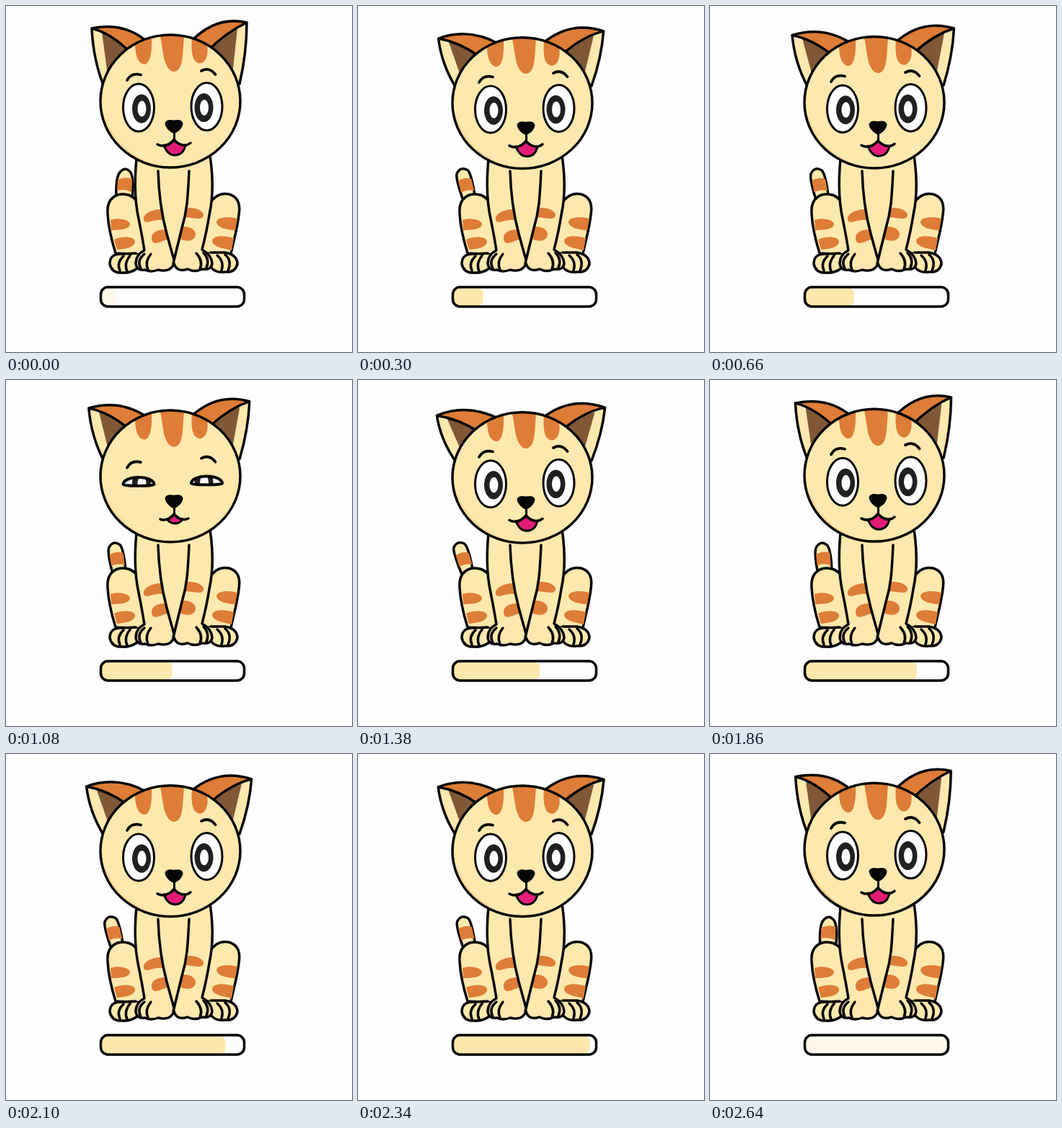
Animation of 480x480 px, one loop 2700 ms. Source, as an HTML page with a canvas:

```html
<!DOCTYPE html>
<html>
<head>
<meta charset="utf-8">
<style>
html, body { margin: 0; width: 100%; height: 100%; overflow: hidden; background: #fefefe; }
canvas { display: block; }
</style>
</head>
<body>
<canvas id="stage" width="480" height="480"></canvas>
<script>
const ctx = document.getElementById('stage').getContext('2d');
const LOOP = 2700, SWAY = 900, STEP = 60, LINE = 3.5;
const INK = '#050505', CREAM = '#fde8ae', ORANGE = '#de7d37', BROWN = '#805837', PINK = '#e31c78', WHITE = '#fefefe';
ctx.lineCap = ctx.lineJoin = 'round';

function draw(path, fill, line = 0) {
  const shape = new Path2D(path);
  if (fill) { ctx.fillStyle = fill; ctx.fill(shape); }
  if (line) { ctx.strokeStyle = INK; ctx.lineWidth = line; ctx.stroke(shape); }
}

function oval(x, y, rx, ry, fill, line) {
  draw(`M${x - rx} ${y}a${rx} ${ry} 0 0 1 ${2 * rx} 0a${rx} ${ry} 0 0 1 ${-2 * rx} 0Z`, fill, line);
}

const mix = (a, b, k) => a + (b - a) * k;
const clamp = v => Math.max(0, Math.min(1, v));

// Blends two paths that share the same commands.
function morph(a, b, k) {
  const ends = b.match(/[\d.]+/g);
  let i = 0;
  return a.replace(/[\d.]+/g, n => mix(+n, +ends[i++], k).toFixed(2));
}

function track(time, keys) {
  const i = Math.max(1, keys.findIndex(key => key[0] >= time));
  const [t0, v0] = keys[i - 1], [t1, v1] = keys[i];
  return mix(v0, v1, (time - t0) / (t1 - t0));
}

const EAR_KEYS = [[0, 0], [60, .06], [180, .42], [360, .9], [420, 1], [480, .96], [540, .78], [660, .5], [720, .2], [840, .03], [900, 0]];
const TAIL_KEYS = [[0, 0], [60, .39], [180, .57], [300, .8], [420, 1], [480, .97], [540, .78], [660, .68], [720, .4], [840, .03], [900, 0]];

function tail(k) {
  draw(morph('M153 268Q152 240 157 232Q165 221 173 231Q178 240 175 268',
             'M146 275Q131 240 132 233Q136 222 147 227Q153 232 160 270', k), CREAM, LINE);
  draw(morph('M155 241Q165 236 175 240L174 258Q164 253 154 256Z',
             'M135 243Q145 237 153 240L158 256Q150 254 140 259Z', k), ORANGE);
}

function body() {
  // Haunches
  draw('M184 275C178 262 165 259 155 262C144 266 140 275 141 288C142 310 148 330 152 343L192 345', CREAM, LINE);
  draw('M282 275C290 262 300 259 309 261C320 264 325 272 323.5 286C321 310 315 328 312 344L272 343', CREAM, LINE);
  draw('M145 297C155 293 172 296 172 303C171 310 158 311 146 311Z M150 324C160 319 179 319 179 327C178 335 166 337 154 338Z', ORANGE);
  draw('M321 295C308 291 292 293 292 300C293 307 306 311 318 311Z M316 322C303 318 287 318 286 326C287 334 300 336 313 339Z', ORANGE);
  // Hind paws
  draw('M161 344Q144 343 144 358Q147 371 161 370Q173 371 182 364L190 345Z', CREAM);
  draw('M161 344Q144 343 144 358Q147 371 161 370Q173 371 182 364M163 347Q153 356 158 367M173 345Q163 357 168 368M161 344L180 343', null, LINE);
  draw('M304 342Q321 345 321 358Q318 370 304 369Q291 371 284 362L276 343Z', CREAM);
  draw('M304 342Q321 345 321 358Q318 370 304 369Q291 371 284 362M293 346Q303 354 299 367M304 345Q314 353 308 367M284 342L304 342', null, LINE);
  // Chest and front legs
  draw('M183 195Q175 255 184 295Q189 320 192 339Q180 345 180 358Q182 368 193 366Q201 370 211 366Q229 370 233 357Q237 370 252 365Q262 370 272 365Q285 367 286 357Q285 345 272 338Q279 310 282 290Q291 250 281 195Z', CREAM, LINE);
  draw('M191 296C190 288 203 282 216 282L218 297C207 296 203 299 196 300Q191 300 191 296Z M202 322C202 314 210 310 221 310L225 324C217 325 213 329 207 329Q202 328 202 322Z', ORANGE);
  draw('M252 280C265 279 275 285 274 291C272 298 263 294 249 293Z M245 306C256 305 264 311 263 318C261 327 250 328 239 322Z', ORANGE);
  draw('M211 229C212 265 216 290 223 316L233 352M254 229C252 270 251 285 244 308L232 357', null, LINE);
  draw('M192 344Q181 353 187 364M201 344Q192 355 197 366M274 342Q283 352 278 363M264 343Q274 354 269 365', null, LINE);
}

function ears(k) {
  const at = (a, b, fill, line) => draw(morph(a, b, k), fill, line);
  at('M119 31Q121 75 136 112L172 66Z', 'M109 50Q114 83 136 114L168 72Z', CREAM);
  at('M133 36L141 96L174 66Q152 44 133 36Z', 'M123 54L143 98L168 71Q145 59 123 54Z', BROWN);
  at('M196 50Q165 22 119 31Q146 38 172 64Z', 'M196 54Q150 32 109 50Q140 55 165 71Z', ORANGE);
  at('M196 50Q165 22 119 31Q121 75 136 112M119 31Q146 38 172 64', 'M196 54Q150 32 109 50Q114 83 136 114M109 50Q140 55 165 71', null, LINE);

  at('M334 23Q334 65 324 108L280 62Z', 'M343 39Q339 75 324 112L288 66Z', CREAM);
  at('M321 31L314 96L280 62Q301 41 321 31Z', 'M329 45L313 99L286 68Q308 49 329 45Z', BROWN);
  at('M256 50Q291 13 334 23Q306 36 280 62Z', 'M256 53Q295 22 343 39Q315 44 288 66Z', ORANGE);
  at('M256 50Q291 13 334 23Q334 65 324 108M334 23Q306 36 280 62', 'M256 53Q295 22 343 39Q339 75 324 112M343 39Q315 44 288 66', null, LINE);
}

function eye(x, y, pupilX, squint) {
  const corner = mix(y, y + 2.5, squint), top = mix(33, 10, squint), bottom = mix(33, 2, squint);
  const outline = `M${x - 21.5} ${corner}a21.5 ${top} 0 0 1 43 0a21.5 ${bottom} 0 0 1 -43 0Z`;
  ctx.save();
  ctx.clip(new Path2D(outline));
  draw(outline, WHITE);
  oval(pupilX, y + 1.5, 13, 20, '#202020');
  oval(pupilX + .5, y + 1.5, 6, 11, WHITE);
  ctx.restore();
  draw(outline, null, mix(3, 4, squint));
}

// The head sinks and flattens slightly as the ears fold out.
function head(sway, squint) {
  ctx.save();
  ctx.translate(0, 5.65 * sway);
  ctx.scale(1, 1 - .0163 * sway);
  oval(228, 132, 97, 92, CREAM);
  draw('M132 140A97 92 0 0 0 225 224Q155 213 132 140Z', '#fcd99a');
  draw('M179 54Q180 80 192 81Q203 80 202 44Z M214 41Q217 60 219 72C222 84 227 91 233 91C240 91 244 82 245 70L247 41Z M258 44Q256 68 262 76Q270 84 277 74Q281 66 279 54Z', ORANGE);
  oval(228, 132, 97, 92, null, LINE);
  eye(184, 141, 188, squint);
  eye(278.5, 139.5, 274.5, squint);
  const browDrop = 17 * squint;
  ctx.translate(0, browDrop);
  draw('M168 103Q174 92 187 95.5M271 90Q282 84 290.5 95', null, 3.8);
  ctx.translate(0, -browDrop);
  draw('M222 163Q223 158 233 160Q243 158 244 163Q243 170 236 174Q233 176 230 174Q223 169 222 163Z M233.5 174L233.5 185', INK, 3);
  draw(morph('M219 193Q224 207 234 207Q246 207 249 193Q240 194 233 185Q226 194 219 193Z',
             'M223 192Q228 198 234 198Q241 198 245 192Q238 192 233 185Q228 192 223 192Z', squint), PINK, 3);
  draw(morph('M210 192Q222 198 233 186Q246 198 256 190', 'M214 192Q223 196 233 185Q244 196 253 191', squint), null, LINE);
  ctx.restore();
}

function bar(t) {
  ctx.fillStyle = '#fce7ad';
  ctx.globalAlpha = clamp(Math.min(.25 + t / 240, (2690 - t) / 230));
  ctx.beginPath();
  ctx.roundRect(132, 391, Math.min(198, 20 + t * .0726), 25, 8);
  ctx.fill();
  ctx.globalAlpha = 1;
  ctx.strokeStyle = INK;
  ctx.lineWidth = LINE;
  ctx.beginPath();
  ctx.roundRect(131.5, 390, 199, 27, 10);
  ctx.stroke();
}

function frame() {
  const t = Math.floor(performance.now() % LOOP / STEP) * STEP;
  const phase = t % SWAY;
  const sway = track(phase, EAR_KEYS);
  const squint = t > 870 && t < 1290 ? Math.sin(Math.PI * (t - 870) / 420) : 0;
  ctx.fillStyle = WHITE;
  ctx.fillRect(0, 0, 480, 480);
  tail(track(phase, TAIL_KEYS));
  body();
  ears(sway);
  head(sway, squint);
  bar(t);
  requestAnimationFrame(frame);
}
frame();
</script>
</body>
</html>
```
